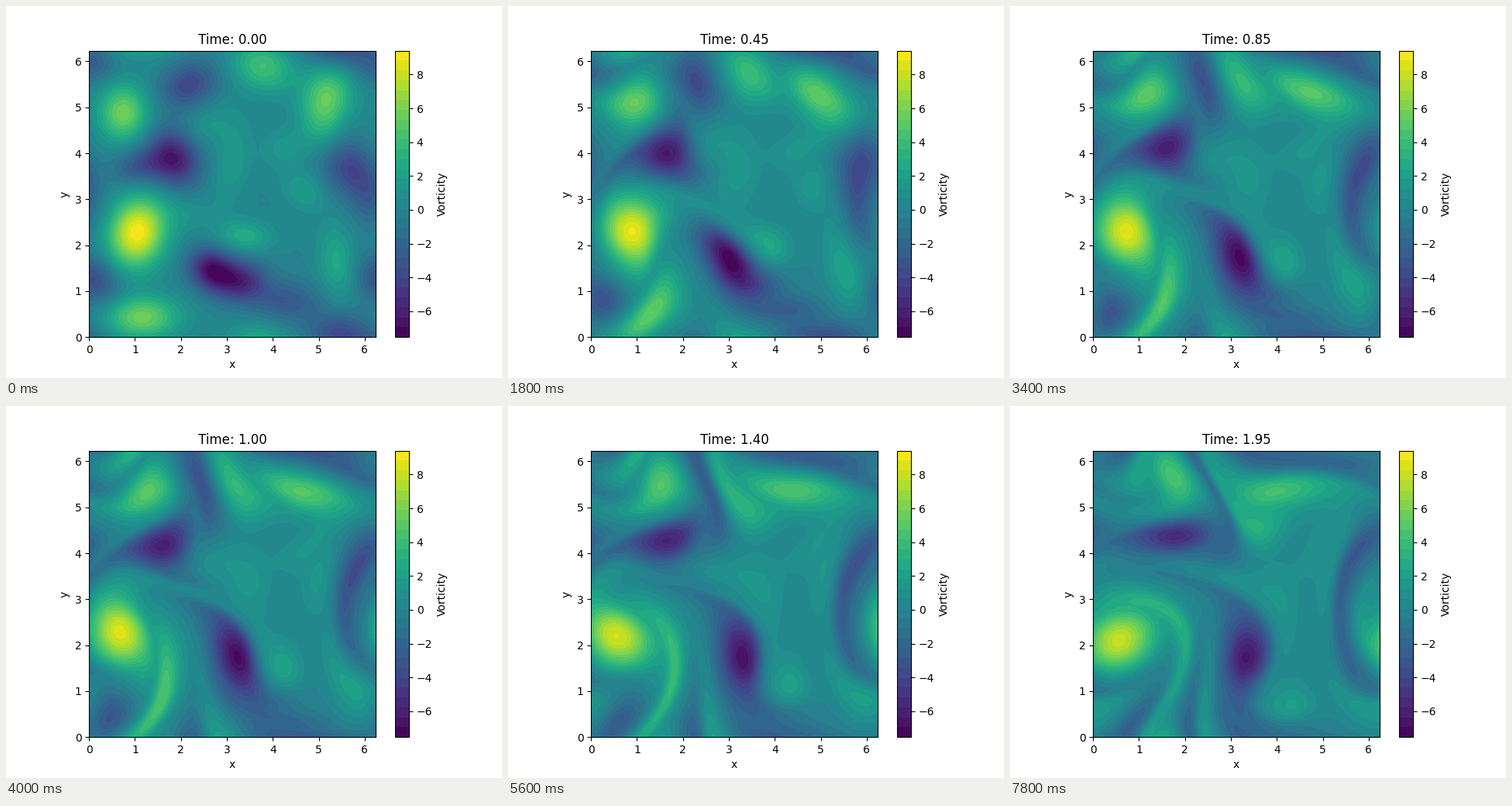
Animation of 640 by 480 pixels, one loop 8 s. Source, as a matplotlib script:

```python
import numpy as np
import matplotlib.pyplot as plt
from matplotlib.animation import FuncAnimation

N = 128
FRAMES = 40
FRAME_DT = 0.05
SUBSTEPS = 4
VISCOSITY = 0.01
LOW, HIGH = -7.53, 9.41

# Starting vortices: strength, x, y, long radius, short radius, tilt in degrees
VORTICES = [
    (9.3, 1.05, 2.28, 0.54, 0.43, 75),
    (5.8, 0.75, 4.88, 0.44, 0.38, 90),
    (5.7, 1.15, 0.43, 0.56, 0.33, 0),
    (4.2, 3.78, 5.90, 0.50, 0.38, -20),
    (5.3, 5.18, 5.22, 0.48, 0.38, 75),
    (1.6, 5.05, 4.50, 0.35, 0.30, 90),
    (2.7, 5.40, 1.62, 0.58, 0.28, 95),
    (2.9, 3.38, 2.20, 0.42, 0.24, -5),
    (1.7, 3.10, 3.80, 0.65, 0.28, 80),
    (1.8, 4.68, 3.18, 0.36, 0.28, -40),
    (1.5, 4.25, 4.10, 0.35, 0.32, 20),
    (1.3, 2.60, 4.60, 0.40, 0.30, 30),
    (1.0, 2.15, 2.70, 0.40, 0.30, 0),
    (-6.3, 1.85, 3.90, 0.46, 0.38, -60),
    (-3.2, 1.10, 3.72, 0.40, 0.28, 10),
    (-7.0, 2.68, 1.45, 0.38, 0.32, -35),
    (-5.0, 3.35, 1.22, 0.38, 0.32, 0),
    (-4.0, 2.18, 5.50, 0.46, 0.34, 25),
    (-4.0, 5.68, 3.65, 0.48, 0.38, -60),
    (-2.0, 6.15, 2.95, 0.45, 0.30, 90),
    (-3.8, 0.10, 1.25, 0.42, 0.35, -35),
    (-4.0, 5.45, 0.06, 0.50, 0.33, 0),
    (-2.8, 4.30, 0.78, 0.55, 0.32, 0),
    (-2.4, 0.05, 5.95, 0.38, 0.30, 0),
]

x = np.linspace(0, 2 * np.pi, N, endpoint=False)
X, Y = np.meshgrid(x, x)
k = np.fft.fftfreq(N, 1 / N)
KX, KY = np.meshgrid(k, k)
K2 = KX**2 + KY**2
INV_K2 = 1 / np.where(K2 == 0, 1, K2)
DEALIAS = np.where(np.maximum(abs(KX), abs(KY)) < N / 3, 1.0, 0.0)


def wrap(d):
    return (d + np.pi) % (2 * np.pi) - np.pi


def start_field():
    w = np.zeros((N, N))
    for amp, cx, cy, a, b, tilt in VORTICES:
        dx, dy = wrap(X - cx), wrap(Y - cy)
        c, s = np.cos(np.radians(tilt)), np.sin(np.radians(tilt))
        w += amp * np.exp(-((c * dx + s * dy) / a)**2 / 2
                          - ((c * dy - s * dx) / b)**2 / 2)
    return w


def real(f):
    return np.fft.ifft2(f).real


def rate(wh):
    psi = wh * INV_K2
    u, v = real(1j * KY * psi), real(-1j * KX * psi)
    advection = u * real(1j * KX * wh) + v * real(1j * KY * wh)
    return -DEALIAS * np.fft.fft2(advection) - VISCOSITY * K2 * wh


def step(wh, dt):
    a = rate(wh)
    b = rate(wh + dt / 2 * a)
    c = rate(wh + dt / 2 * b)
    d = rate(wh + dt * c)
    return wh + dt / 6 * (a + 2 * b + 2 * c + d)


def simulate():
    wh = np.fft.fft2(start_field())
    fields = []
    for _ in range(FRAMES):
        fields.append(np.clip(real(wh), LOW, HIGH))
        for _ in range(SUBSTEPS):
            wh = step(wh, FRAME_DT / SUBSTEPS)
    return fields


fields = simulate()
levels = np.linspace(LOW, HIGH, 30)

fig, ax = plt.subplots(figsize=(6.4, 4.8), dpi=100)
ax.set_aspect("equal")
contours = ax.contourf(X, Y, fields[0], levels=levels, cmap="viridis")
fig.colorbar(contours, ax=ax, label="Vorticity", ticks=range(-6, 9, 2))


def draw(i):
    ax.clear()
    ax.contourf(X, Y, fields[i], levels=levels, cmap="viridis")
    ax.set_aspect("equal")
    ax.set_xlabel("x")
    ax.set_ylabel("y")
    ax.set_title(f"Time: {i * FRAME_DT:.2f}")
    return []


anim = FuncAnimation(fig, draw, frames=FRAMES, init_func=lambda: [],
                     interval=200, repeat=True, repeat_delay=0)
plt.show()
```
